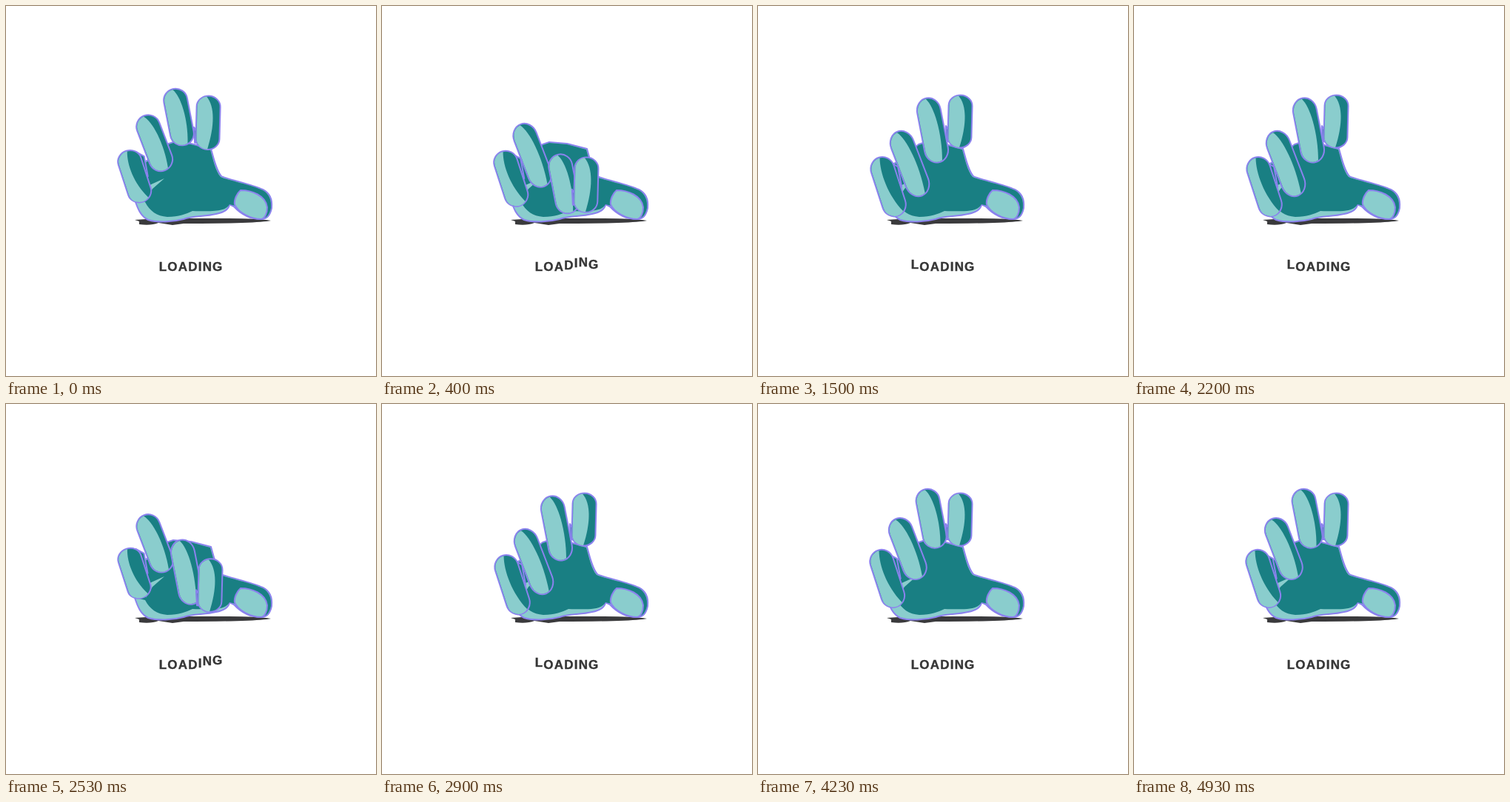
An HTML page without scripts that plays this animation: 500x500 px, repeating every 5.01 s.

```html
<!DOCTYPE html>
<html lang="en">
<head>
<meta charset="utf-8">
<title>Loading</title>
<style>
  @property --tick { syntax: "<number>"; inherits: true; initial-value: 0; }
  @keyframes clock { from { --tick: 0; } to { --tick: 100; } }

  html, body { margin: 0; width: 100%; height: 100%; overflow: hidden; background: #fff; }
  /* 100 stepped ticks per loop; one drum roll takes 14 of them */
  body { position: relative; --step: calc(360deg / 14); animation: clock 5010ms steps(100) -30ms infinite; }
  svg { display: block; width: 100%; height: 100%; }

  .dark { fill: #197f83; }
  .light { fill: #8acdcd; }
  .line { stroke: #8b82ee; stroke-width: 2; stroke-linejoin: round; stroke-linecap: round; vector-effect: non-scaling-stroke; }
  .shadow { fill: #3a3a3c; }

  /* bend runs 0 (raised) to 1 (tapping); hover flattens the top of the wave */
  .finger {
    --wave: calc((1 - cos((var(--tick) - var(--lag)) * var(--step))) / 2);
    --bend: calc(var(--wave) * (1 - var(--hover) + var(--hover) * var(--wave)));
    transform: translate(calc((var(--x) + var(--dx) * var(--bend)) * 1px), calc((var(--y) + var(--dy) * var(--bend)) * 1px));
  }
  .tip { transform: rotate(var(--tilt)) scale(1, calc(var(--size) + .9 * var(--bend) * (1 - var(--bend)))); }

  #pinky  { --lag: -2.7; --hover: 1; --x: 173.2; --y: 227; --dx: 5;  --dy: 30; --tilt: -18deg; --size: .83; }
  #ring   { --lag: -2.3; --hover: 1; --x: 200;   --y: 181; --dx: 11; --dy: 70; --tilt: -21deg; --size: .95; }
  #middle { --lag: 0;    --hover: 0; --x: 233.5; --y: 150; --dx: 13; --dy: 95; --tilt: -11deg; --size: .98; }
  #index  { --lag: 1.7;  --hover: 1; --x: 273;   --y: 156; --dx: 3;  --dy: 90; --tilt: 1.5deg; --size: .9; }

  .label {
    position: absolute; left: 206.7px; top: 344px; white-space: nowrap;
    font: bold 17px/17px "Liberation Sans", Arial, sans-serif; letter-spacing: 1.2px;
    color: #363636; -webkit-text-stroke: .4px #363636;
  }
  /* each letter hops one tick after the one before it */
  .label span {
    --hop: max(0, cos((var(--tick) - 3.3 - var(--i)) * var(--step)) - .62);
    display: inline-block;
    transform: translateY(calc(-16px * var(--hop)));
  }
</style>
</head>
<body>
<svg viewBox="0 0 500 500">
  <defs>
    <rect id="capsule" class="dark line" x="-16" y="-39.5" width="32" height="79" rx="16"/>
    <path id="glow" class="light" d="M-1-38.5C8-28 12 5 5 38A15 15 0 0 1-15 24V-24A15 15 0 0 1-1-38.5Z"/>
  </defs>

  <path class="shadow" d="M174 289L205 287H300Q340 287 358 290Q340 294 240 294L225 296L206 293Q196 297 180 295V291Z"/>

  <g id="palm">
    <path class="light line" d="M180 215L192 208L217 187L226 184L250 186L277 193C281 207 284 222 291 230C298 234 333 241 347 248C357 253 360 263 359 273C357 283 353 288 345 288C331 288 318 282 308 271L302 268C301 275 294 279 284 281C268 285 252 283 240 288C225 292 205 293 192 289C182 284 178 274 174 262Z"/>
    <path class="dark" d="M181 216L193 209L217 188L226 185L250 187L276 194C280 208 283 223 290 231C298 235 333 242 347 249C356 254 359 263 358 273C356 282 353 286 346 287L310 270L302 268C297 277 285 278 252 277C243 281 234 285 218 285C204 284 194 277 188 265L176 262Z"/>
    <path class="light" d="M214 233L194 242L189 262L198 247Z"/>
    <path class="light line" d="M317 249C332 249 351 256 353 272C353 280 350 287 345 288C330 288 313 278 309 268C308 262 312 253 317 249Z"/>
  </g>

  <g id="pinky" class="finger">
    <path class="dark line" d="M2-33L13-27L18 0H0Z"/>
    <g class="tip">
      <use href="#capsule"/>
      <path class="light" d="M1-38.5C-5-20-4 10 9 36A15 15 0 0 1-15 24V-24A15 15 0 0 1 1-38.5Z"/>
    </g>
  </g>
  <g id="ring" class="finger">
    <g class="tip"><use href="#capsule"/><use href="#glow"/></g>
  </g>
  <g id="middle" class="finger">
    <g class="tip"><use href="#capsule"/><use href="#glow"/></g>
  </g>
  <g id="index" class="finger">
    <path class="dark line" d="M-19 6L-16 11V27H-18Z"/>
    <g class="tip">
      <use href="#capsule"/>
      <path class="light" d="M-3-38.5C9-24 9 5 0 39A15 15 0 0 1-15 24V-24A15 15 0 0 1-3-38.5Z"/>
    </g>
  </g>
</svg>
<div class="label"><span style="--i:0">L</span><span style="--i:1">O</span><span style="--i:2">A</span><span style="--i:3">D</span><span style="--i:4">I</span><span style="--i:5">N</span><span style="--i:6">G</span></div>
</body>
</html>
```
